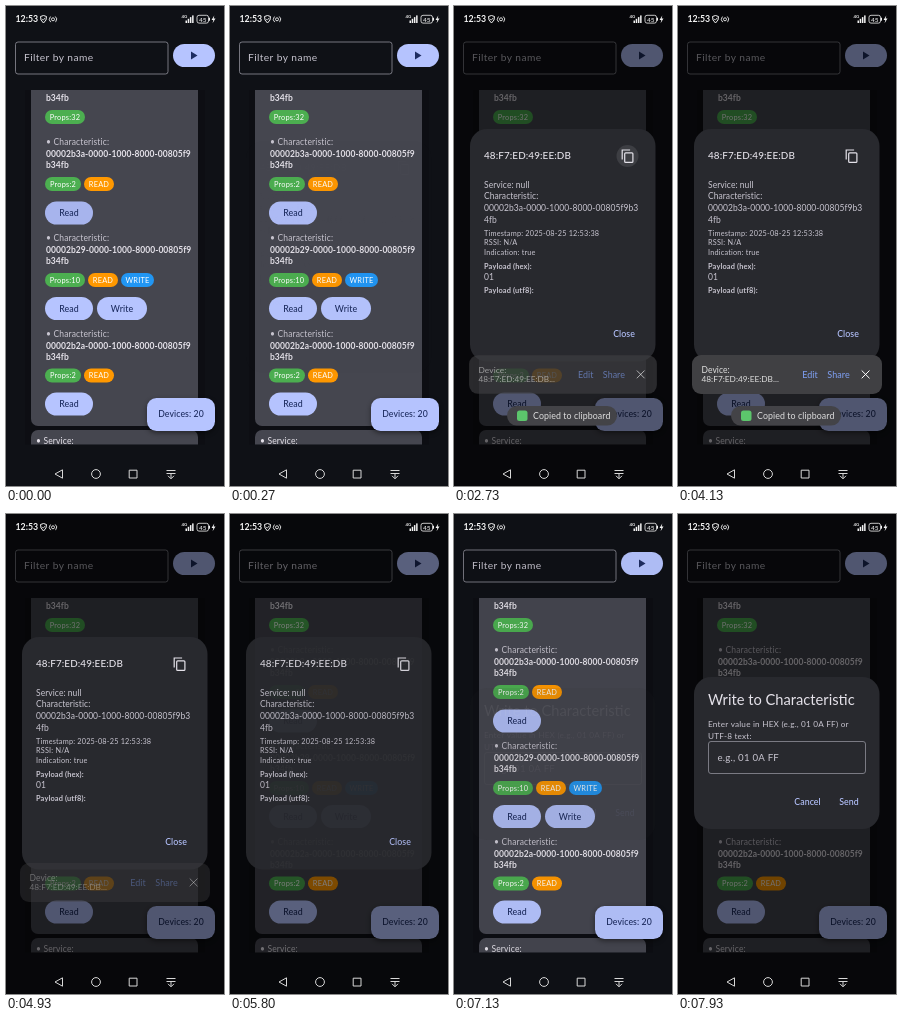
An HTML page with a canvas for the animation above (8 s loop, 218 by 480 pixels).

```html
<!DOCTYPE html>
<html lang="en">
<head>
<meta charset="utf-8">
<title>Device inspector</title>
<style>
  html, body { margin: 0; width: 100%; height: 100%; overflow: hidden; background: #0f1116; }
  canvas { display: block; width: 218px; height: 480px; }
</style>
</head>
<body>
<canvas id="stage"></canvas>
<script>
const W = 218, H = 480, LOOP = 8000;
const canvas = document.getElementById('stage');
const ctx = canvas.getContext('2d');
const dpr = window.devicePixelRatio || 1;
canvas.width = W * dpr;
canvas.height = H * dpr;

const C = {
  bg: '#0f1116', list: '#0d0e13', card: '#45464f', dialog: '#28292e',
  accent: '#b6c4ff', ink: '#1e2d61', text: '#e4e1e9', soft: '#c8c5d0',
  line: '#90909a', green: '#4caf50', orange: '#ff9800', blue: '#2196f3',
  clip: '#404043', link: '#7fa0f5', scrim: 'rgba(0,0,0,.56)'
};

const clamp = v => Math.max(0, Math.min(1, v));
const smooth = v => v * v * (3 - 2 * v);
const ramp = (t, start, length) => smooth(clamp((t - start) / length));
const pulse = (t, on, off) => ramp(t, on, 150) * (1 - ramp(t, off, 150));

function text(s, x, y, { size = 8.5, weight = 400, color = C.text, gap = 0.05, align = 'left' } = {}) {
  ctx.font = `${weight} ${size}px Lato, sans-serif`;
  ctx.letterSpacing = gap + 'px';
  ctx.textAlign = align;
  ctx.fillStyle = color;
  ctx.fillText(s, x, y + size * 0.355);
}

function box(x, y, w, h, r, fill, stroke, width = 0.8) {
  ctx.beginPath();
  ctx.roundRect(x, y, w, h, r);
  if (fill) { ctx.fillStyle = fill; ctx.fill(); }
  if (stroke) { ctx.strokeStyle = stroke; ctx.lineWidth = width; ctx.stroke(); }
}

function path(points, { fill, stroke, width = 1, close = false }) {
  ctx.beginPath();
  points.forEach(([x, y], i) => i ? ctx.lineTo(x, y) : ctx.moveTo(x, y));
  if (close) ctx.closePath();
  if (fill) { ctx.fillStyle = fill; ctx.fill(); }
  if (stroke) { ctx.strokeStyle = stroke; ctx.lineWidth = width; ctx.stroke(); }
}

function circle(x, y, r, fill, stroke, width = 1) {
  ctx.beginPath();
  ctx.arc(x, y, r, 0, Math.PI * 2);
  if (fill) { ctx.fillStyle = fill; ctx.fill(); }
  if (stroke) { ctx.strokeStyle = stroke; ctx.lineWidth = width; ctx.stroke(); }
}

function layer(alpha, draw) {
  if (alpha <= 0) return;
  ctx.save();
  ctx.globalAlpha *= alpha;
  draw();
  ctx.restore();
}

function button(label, x, y, w, press = 0) {
  box(x, y - 11.5, w, 23, 11.5, C.accent);
  layer(press, () => box(x, y - 11.5, w, 23, 11.5, 'rgba(29,39,85,.1)'));
  text(label, x + w / 2, y, { size: 8.8, weight: 500, color: C.ink, align: 'center', gap: 0.1 });
}

function chip(label, x, y, w, color) {
  box(x, y - 7, w, 14, 7, color);
  text(label, x + w / 2, y, { size: 7.4, color: '#fff', align: 'center', gap: 0.2 });
}

function characteristic(id, y, props, propsWidth, writable) {
  text('• Characteristic:', 40, y, { color: C.soft, gap: 0.15 });
  text(`0000${id}-0000-1000-8000-00805f9`, 40, y + 12, { weight: 700 });
  text('b34fb', 40, y + 23, { weight: 700 });
  chip('Props:' + props, 39, y + 42, propsWidth, C.green);
  chip('READ', 42 + propsWidth, y + 42, 30, C.orange);
  if (writable) chip('WRITE', 75 + propsWidth, y + 42, 33, C.blue);
}

function page(t) {
  box(9.5, 36, 152.5, 32, 2.5, null, C.line);
  text('Filter by name', 18, 51.5, { size: 10.2, color: C.soft, gap: 0.4 });
  box(167, 38, 42, 23, 11.5, C.accent);
  path([[185, 45.5], [185, 53.5], [191.5, 49.5]], { fill: C.ink });

  ctx.save();
  ctx.beginPath();
  ctx.rect(19, 84, 180, 354.5);
  ctx.clip();
  ctx.fillStyle = C.list;
  ctx.fillRect(19, 84, 180, 355);
  box(25, 60, 167, 360, 7, C.card);
  text('b34fb', 40, 91.5, { weight: 700 });
  chip('Props:32', 39, 111, 40, C.green);
  characteristic('2b3a', 136, 2, 36);
  button('Read', 39, 207, 48, 1 - ramp(t, 100, 300));
  characteristic('2b29', 232, 10, 40, true);
  button('Read', 39, 302.5, 48);
  button('Write', 91, 302.5, 50, pulse(t, 6860, 7020));
  characteristic('2b2a', 327.5, 2, 36);
  button('Read', 39, 398, 48);
  box(25, 424, 167, 40, 7, C.card);
  text('• Service:', 30, 434.5, { gap: 0.15 });
  ctx.restore();

  ctx.save();
  ctx.shadowColor = 'rgba(0,0,0,.45)';
  ctx.shadowBlur = 5 * dpr;
  ctx.shadowOffsetY = 2 * dpr;
  box(141, 392, 68, 33, 9.5, C.accent);
  ctx.restore();
  text('Devices: 20', 175, 408.3, { size: 8.7, weight: 500, color: C.ink, align: 'center', gap: 0.1 });
}

function systemBars() {
  const white = '#f2f2f2';
  text('12:53', 9.5, 13.3, { size: 8.8, weight: 700, color: white, gap: 0 });
  path([[34.5, 10.5], [37.5, 9.5], [40.5, 10.5], [40, 14], [37.5, 17], [35, 14]],
    { stroke: white, close: true });
  path([[36, 12.8], [37.3, 14.2], [39.2, 11.8]], { stroke: white, width: 0.8 });
  circle(47, 13.3, 1.5, null, white, 0.9);
  for (const [a, b] of [[-0.9, 0.9], [2.24, 4.04]]) {
    ctx.beginPath();
    ctx.arc(47, 13.3, 3.6, a, b);
    ctx.stroke();
  }
  text('4G', 175.5, 10.5, { size: 4.5, weight: 700, color: white, gap: 0 });
  for (let i = 0; i < 4; i++) {
    ctx.fillStyle = white;
    ctx.fillRect(179.5 + i * 2.2, 14.5 - i * 1.7, 1.5, 2.5 + i * 1.7);
  }
  box(191, 9.3, 11.5, 7.8, 2, null, white);
  ctx.fillStyle = white;
  ctx.fillRect(203, 11.7, 1, 3);
  text('45', 196.8, 13.3, { size: 6.5, weight: 500, color: white, gap: 0, align: 'center' });
  path([[208.3, 9.5], [205.5, 14], [207.3, 14], [206.6, 17.2], [209.5, 12.5], [207.7, 12.5]], { fill: white });

  const nav = '#d8d8d8';
  path([[49, 468], [56.5, 463.8], [56.5, 472.2]], { stroke: nav, close: true });
  circle(90, 468, 4.4, null, nav);
  path([[123.2, 464.2], [131, 464.2], [131, 472], [123.2, 472]], { stroke: nav, close: true });
  path([[160.5, 464.5], [169.5, 464.5]], { stroke: nav });
  path([[160.5, 467.5], [169.5, 467.5]], { stroke: nav });
  path([[165, 467.5], [165, 472.5]], { stroke: nav });
  path([[162, 469.8], [165, 472.8], [168, 469.8]], { stroke: nav });
}

function copyIcon(x, y) {
  box(x - 2.8, y - 3.2, 8.2, 9.6, 1, null, C.text, 1.2);
  path([[x - 5.3, y + 3.6], [x - 5.3, y - 6], [x + 2.6, y - 6]], { stroke: C.text, width: 1.2 });
}

function readDialog(t) {
  box(16, 123, 185.5, 232.5, 17, C.dialog);
  text('48:F7:ED:49:EE:DB', 30, 149.5, { size: 9.9, weight: 500, gap: 0.1 });
  layer(pulse(t, 2200, 3000), () => circle(173.5, 150, 11, '#3d3e43'));
  copyIcon(173.5, 150);
  const body = ['Service: null', 'Characteristic:', '00002b3a-0000-1000-8000-00805f9b3', '4fb'];
  body.forEach((s, i) => text(s, 30, 178.5 + i * 11.7, { color: C.soft }));
  const details = ['Timestamp: 2025-08-25 12:53:38', 'RSSI: N/A', 'Indication: true'];
  details.forEach((s, i) => text(s, 30, 227.5 + i * 9.4, { size: 7.3, color: C.soft, gap: 0.2 }));
  const heading = { size: 7.4, weight: 700, color: C.soft, gap: 0.15 };
  text('Payload (hex):', 30, 260, heading);
  text('01', 30, 270.5, { color: C.soft });
  text('Payload (utf8):', 30, 284.5, heading);
  text('Close', 170, 328, { size: 8.8, weight: 500, color: C.accent, align: 'center' });
}

function writeDialog() {
  box(16, 163, 185.5, 152, 17, C.dialog);
  text('Write to Characteristic', 30, 185.5, { size: 14.7, gap: 0 });
  text('Enter value in HEX (e.g., 01 0A FF) or', 30, 210.5, { size: 8.2, color: C.soft, gap: 0.2 });
  text('UTF-8 text:', 30, 222, { size: 8.2, color: C.soft, gap: 0.2 });
  box(30.5, 227.5, 157, 32, 2.5, null, C.line);
  text('e.g., 01 0A FF', 39.5, 243.5, { size: 9.7, color: C.soft, gap: 0.2 });
  const action = { size: 8.8, weight: 500, color: C.accent, align: 'center' };
  text('Cancel', 129.5, 287.5, action);
  text('Send', 171, 287.5, action);
}

function modal(shown, rise, draw) {
  layer(shown, () => {
    ctx.fillStyle = C.scrim;
    ctx.fillRect(0, 0, W, H);
    ctx.translate(0, rise);
    draw();
  });
}

function clipboardPanel() {
  box(14, 349, 190, 39, 9, C.clip);
  text('Device:', 23.5, 363.5, { color: '#dedede' });
  text('48:F7:ED:49:EE:DB...', 23.5, 373.5, { size: 8.3, color: '#dedede', gap: 0 });
  text('Edit', 132, 368.5, { size: 9, color: C.link, align: 'center' });
  text('Share', 160.5, 368.5, { size: 9, color: C.link, align: 'center' });
  path([[183.7, 364.5], [191.5, 372.3]], { stroke: '#fff' });
  path([[191.5, 364.5], [183.7, 372.3]], { stroke: '#fff' });
}

function toast() {
  box(53, 400, 110, 19.5, 9.75, '#434347');
  box(63, 404.5, 10.5, 10.5, 2.5, '#5cc66c');
  text('Copied to clipboard', 79, 409.8, { size: 8.8, color: '#dedede', gap: 0.1 });
}

function render(t) {
  ctx.setTransform(dpr, 0, 0, dpr, 0, 0);
  ctx.fillStyle = C.bg;
  ctx.fillRect(0, 0, W, H);
  page(t);

  const readIn = ramp(t, 250, 350);
  modal(readIn * (1 - ramp(t, 5745, 300)), 12 * (1 - readIn), () => readDialog(t));

  const writeIn = ramp(t, 7065, 380);
  modal(writeIn, 12 * (1 - writeIn), writeDialog);

  const panelIn = ramp(t, 2610, 210);
  layer(panelIn * (1 - ramp(t, 4780, 260)), () => {
    const scale = 0.97 + 0.03 * panelIn;
    ctx.translate(109, 368.5);
    ctx.scale(scale, scale);
    ctx.translate(-109, -368.5);
    clipboardPanel();
  });
  layer(ramp(t, 2330, 200) * (1 - ramp(t, 4620, 250)), toast);
  systemBars();
}

const begin = performance.now();
function tick() {
  render((performance.now() - begin) % LOOP);
  requestAnimationFrame(tick);
}
tick();
</script>
</body>
</html>
```
